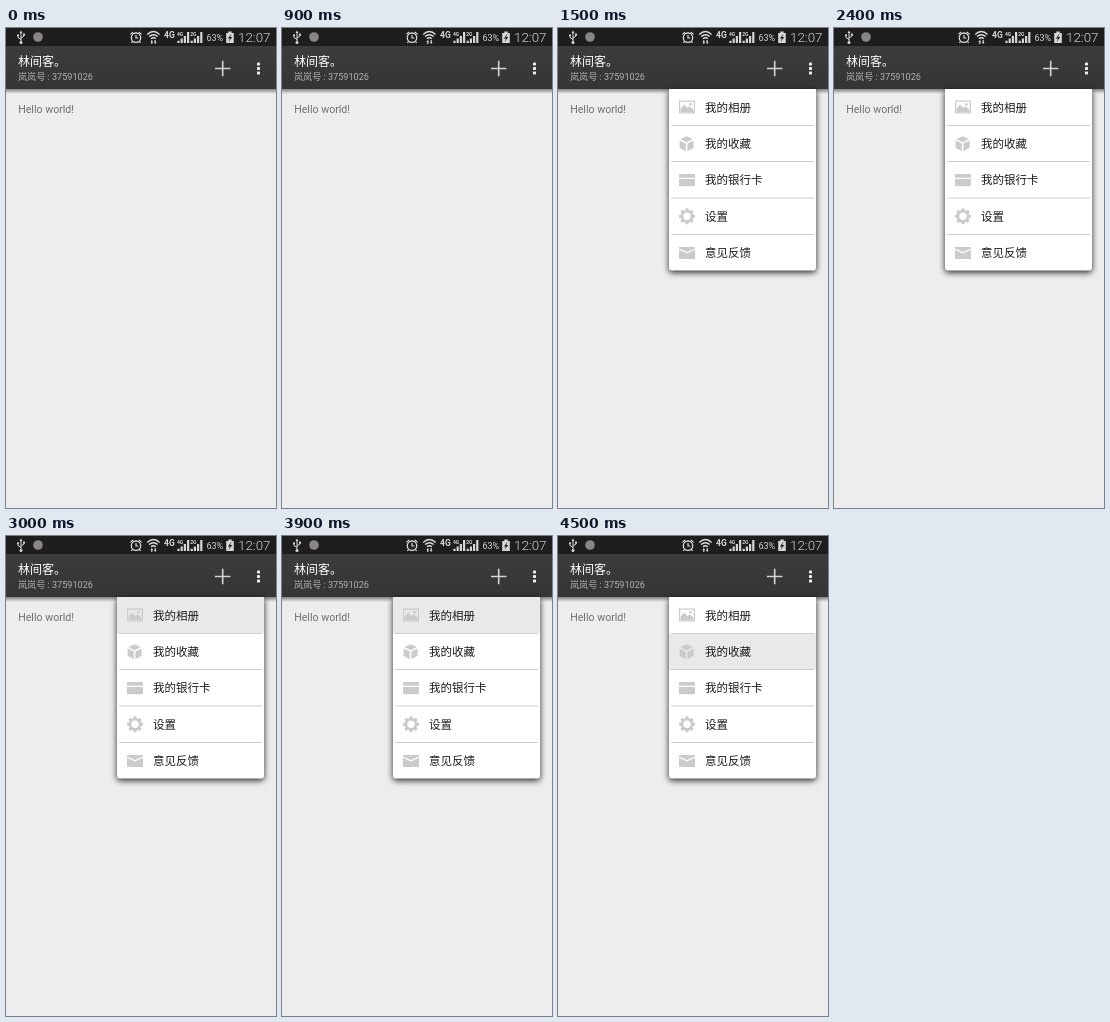
Write an HTML page that moves like this. It is 270 px wide and 480 px high and loops after 6 s.

```html
<!DOCTYPE html>
<html lang="zh-CN">
<head>
<meta charset="utf-8">
<title>Popup menu</title>
<style>
html, body { margin: 0; width: 100%; height: 100%; overflow: hidden; background: #ededed; }
svg { display: block; width: 100%; height: 100%; }
text { font-family: Roboto, "Noto Sans CJK SC", "Noto Sans CJK", sans-serif; }
.menu, .pick { animation: 6s step-end infinite; }
.menu { animation-name: open; }
.first { animation-name: first; }
.second { animation-name: second; }
.panel { fill: #fff; filter: drop-shadow(0 2.5px 3px rgba(0, 0, 0, .85)); }
.pick { fill: #e9e9e9; opacity: 0; }
.label { font-size: 11.5px; font-weight: 500; fill: #1c1c1c; }
.icon { fill: #cbcbcb; }
.line { stroke: #cfcfcf; }
.status { fill: #d6d6d6; }
.stroke { fill: none; stroke: #dcdcdc; }
@keyframes open { 0% { opacity: 0; } 25%, 100% { opacity: 1; } }
@keyframes first { 0% { opacity: 0; } 50% { opacity: 1; } 75%, 100% { opacity: 0; } }
@keyframes second { 0% { opacity: 0; } 75%, 100% { opacity: 1; } }
</style>
</head>
<body>
<svg viewBox="0 0 270 480" preserveAspectRatio="none">
  <defs>
    <linearGradient id="bar" x2="0" y2="1">
      <stop stop-color="#3c3c3c"/><stop offset="1" stop-color="#353535"/>
    </linearGradient>
    <linearGradient id="shade" x2="0" y2="1">
      <stop stop-opacity=".45"/><stop offset="1" stop-opacity="0"/>
    </linearGradient>
    <path id="bars" d="M0 15v-2.2h2.2V15zM3.2 15v-4.6h2.2V15zM6.4 15V7.9h2.2V15zM9.6 15V4h2.2v11z"/>
  </defs>

  <rect width="270" height="480" fill="#ededed"/>
  <rect y="61" width="270" height="5" fill="url(#shade)"/>
  <rect y="18.5" width="270" height="42.5" fill="url(#bar)"/>
  <rect width="270" height="18.75" fill="#1e1e1e"/>

  <!-- status bar -->
  <g class="stroke" stroke-width="1">
    <path d="M15 4v10M15 11.5l-3-2V7.5M15 10l3-2V6.5"/>
    <circle cx="130" cy="9.7" r="4.7" stroke-width="1.3"/>
    <path d="M130 7v3h2.3M124.4 6.4l2.8-2.4M135.6 6.4L132.8 4M126.6 13.4l-1.2 1.4M133.4 13.4l1.2 1.4" stroke-width="1.2"/>
    <path d="M141.2 6.4q6.2-5.6 12.4 0M143.1 8.6q4.3-3.8 8.6 0M145 10.7q2.4-2 4.8 0" stroke-width="1.4"/>
  </g>
  <circle cx="32" cy="9" r="4.8" fill="#8a8686"/>
  <g class="status">
    <path d="M15 2.6l1.5 2.4h-3z"/>
    <circle cx="15" cy="14.4" r="1.5"/>
    <circle cx="12" cy="7.3" r="1.1"/>
    <rect x="17" y="5.6" width="2" height="2"/>
    <path d="M145.8 12l1.4 2h-.8v2h-1.2v-2h-.8zM149.2 16l-1.4-2h.8v-2h1.2v2h.8z"/>
    <text x="158" y="9.7" font-size="8.5" font-weight="700">4G</text>
    <use href="#bars" x="171.4"/>
    <use href="#bars" x="184.6"/>
    <text x="171" y="7.6" font-size="5" font-weight="700">4G</text>
    <text x="184.2" y="7.6" font-size="5" font-weight="700">2G</text>
    <text x="200.5" y="13.2" font-size="9">63%</text>
    <path d="M222.3 3.6h3.4v1.3h2.1v10h-7.6v-10h2.1z"/>
    <text x="232" y="14" font-size="13.4" font-weight="300">12:07</text>
  </g>
  <path d="M225.4 5.8l-3.5 4.6h2l-1.2 3.4 3.6-4.7h-2z" fill="#222"/>

  <!-- action bar -->
  <text x="12" y="38.2" font-size="12" fill="#fff">林间客。</text>
  <text x="12" y="52" font-size="9.1" fill="#b2b2b2">岚岚号 : 37591026</text>
  <path d="M209 40.5h15.4M216.7 32.8v15.4" stroke="#d4d4d4" stroke-width="1.6"/>
  <g fill="#f4f4f4">
    <rect x="251" y="34.5" width="3" height="3" rx=".9"/>
    <rect x="251" y="39" width="3" height="3" rx=".9"/>
    <rect x="251" y="43.5" width="3" height="3" rx=".9"/>
  </g>
  <text x="12.2" y="85" font-size="10.6" fill="#707070">Hello world!</text>

  <!-- popup -->
  <g class="menu">
    <path class="panel" d="M111 61h147v178.5q0 3-3 3h-141q-3 0-3-3z"/>
    <rect class="pick first" x="111" y="61" width="147" height="36.5"/>
    <rect class="pick second" x="111" y="97.5" width="147" height="36"/>
    <path class="line" d="M113 97.5h143M113 133.5h143M113 170h143M113 206.5h143"/>

    <g class="label">
      <text x="147" y="83.5">我的相册</text>
      <text x="147" y="120">我的收藏</text>
      <text x="147" y="156.4">我的银行卡</text>
      <text x="147" y="192.8">设置</text>
      <text x="147" y="229.2">意见反馈</text>
    </g>

    <g class="icon">
      <path fill-rule="evenodd" d="M121 72.5h16v13h-16zM122.2 73.7v10.6h13.6V73.7z"/>
      <path d="M122.6 83.9v-3.3l3.6-4.2 3.2 3.6 2.2-1.8 3.8 3.4v2.3z"/>
      <circle cx="132.5" cy="76.2" r="1.3"/>

      <path d="M128.6 108.2l6.2 2.9-6.2 3.1-6.2-3.1zM121.6 112.4l6.2 3.2v7.6l-6.2-3.4zM135.6 112.4l-6.2 3.2v7.6l6.2-3.4z"/>

      <path d="M121 147q0-1 1-1h14q1 0 1 1v2.8h-16zM121 151h16v6.2q0 1-1 1h-14q-1 0-1-1z"/>

      <circle cx="129" cy="188.3" r="5" fill="none" stroke="#cbcbcb" stroke-width="2.6"/>
      <g id="teeth">
        <path id="tooth" d="M127.2 183.2l.4-2.9h2.8l.4 2.9zM127.2 193.4l.4 2.9h2.8l.4-2.9z"/>
        <use href="#tooth" transform="rotate(45 129 188.3)"/>
      </g>
      <use href="#teeth" transform="rotate(90 129 188.3)"/>

      <path d="M121 219h16v1.4l-8 3.6-8-3.6zM121 221.8l8 3.6 8-3.6v9.2h-16z"/>
    </g>
  </g>
</svg>
</body>
</html>
```
